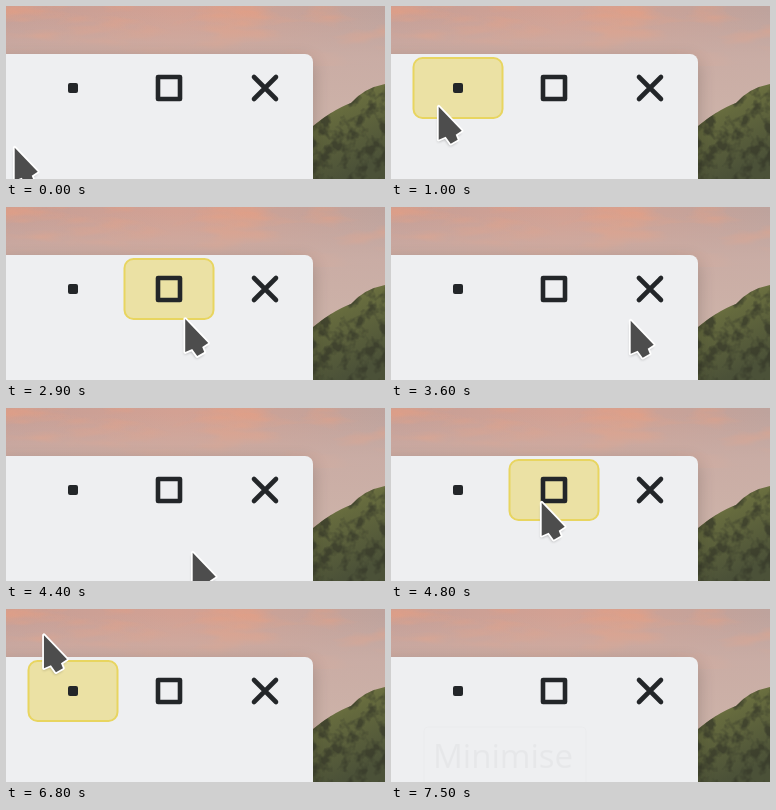
Animation of 379 by 173 pixels, one loop 7600 ms. Source, as an HTML page:

```html
<!DOCTYPE html>
<html lang="en">
<head>
<meta charset="utf-8">
<title>Window buttons</title>
<style>
  html, body { margin: 0; width: 100%; height: 100%; overflow: hidden; }
  svg { display: block; width: 379px; height: 173px; }
  .button { rx: 9px; fill: #e8d560; stroke: #e8d560; stroke-width: 2; fill-opacity: .53; }
  #close { fill: #e0525f; stroke: #e0525f; }
  .icon { fill: none; stroke: #232629; stroke-width: 4.6; stroke-linecap: round; stroke-linejoin: round; }
  #tip text { font: 33px "Open Sans", "Noto Sans", sans-serif; fill: #232629; }
</style>
</head>
<body>
<svg viewBox="0 0 379 173">
  <defs>
    <linearGradient id="sky">
      <stop offset="0" stop-color="#c59f97"/>
      <stop offset=".45" stop-color="#d3a193"/>
      <stop offset="1" stop-color="#bea39d"/>
    </linearGradient>
    <linearGradient id="haze" x2="0" y2="1">
      <stop offset=".03" stop-color="#cbaea6" stop-opacity="0"/>
      <stop offset=".3" stop-color="#cbaea6" stop-opacity=".85"/>
      <stop offset=".7" stop-color="#cdb3a9"/>
    </linearGradient>
    <linearGradient id="grass" x2=".4" y2="1">
      <stop offset="0" stop-color="#86874a"/>
      <stop offset=".4" stop-color="#666b3e"/>
      <stop offset="1" stop-color="#4b5138"/>
    </linearGradient>
    <filter id="clouds" x="0" y="0" width="1" height="1" color-interpolation-filters="sRGB">
      <feTurbulence type="fractalNoise" baseFrequency=".015 .06" numOctaves="3" seed="4"/>
      <feColorMatrix values="0 0 0 0 .92  0 0 0 0 .62  0 0 0 0 .5  3 0 0 0 -1.3"/>
    </filter>
    <filter id="rocks" x="0" y="0" width="1" height="1" color-interpolation-filters="sRGB">
      <feTurbulence type="fractalNoise" baseFrequency=".08" numOctaves="3" seed="9"/>
      <feColorMatrix values="0 0 0 0 .21  0 0 0 0 .22  0 0 0 0 .16  4 0 0 0 -1.75"/>
      <feComposite in2="SourceGraphic" operator="in"/>
    </filter>
    <filter id="blur" x="-20%" y="-20%" width="140%" height="140%"><feGaussianBlur stdDeviation="9"/></filter>
    <filter id="soft" x="-40%" y="-40%" width="180%" height="180%"><feGaussianBlur stdDeviation="1.5"/></filter>
    <path id="hill" d="M300 126Q325 104 345 97 358 82 379 78V173H300Z"/>
    <path id="arrow" d="M0 0V33L7 30 12 37 19 33 17 28 23 24Z"/>
  </defs>

  <rect width="379" height="173" fill="url(#sky)"/>
  <rect width="379" height="60" filter="url(#clouds)" opacity=".6"/>
  <rect width="379" height="173" fill="url(#haze)"/>
  <use href="#hill" fill="url(#grass)"/>
  <use href="#hill" filter="url(#rocks)" opacity=".7"/>

  <rect x="-30" y="54" width="337" height="160" rx="9" fill="#000" opacity=".2" filter="url(#blur)"/>
  <rect x="-30" y="48" width="337" height="160" rx="8" fill="#eeeff1"/>

  <rect class="button" id="min" x="22.5" y="52" width="89" height="60"/>
  <rect class="button" id="max" x="118.5" y="52" width="89" height="60"/>
  <rect class="button" id="close" x="214.5" y="52" width="89" height="60"/>
  <rect x="62" y="77" width="10" height="10" rx="2" fill="#232629"/>
  <path class="icon" d="M152 71h22v22h-22zM248 71l22 22M270 71l-22 22"/>

  <g id="tip">
    <rect x="33" y="118" width="162" height="70" rx="4" fill="#eeeff1" stroke="#999"/>
    <text x="42" y="159">Minimise</text>
  </g>

  <g id="cursor">
    <use href="#arrow" y="2" opacity=".3" filter="url(#soft)"/>
    <use href="#arrow" x=".7" y="-.3" fill="#4d4d4d" stroke="#fff" stroke-width="3.6" stroke-linejoin="round" style="paint-order:stroke"/>
  </g>
</svg>
<script>
  const LOOP = 7600, STEP = 100, FADE_STEPS = 2;
  const $ = id => document.getElementById(id);
  const buttons = { min: 22, max: 118, close: 214 };

  // Pointer moves: start, duration, goal x, goal y, downward bow.
  const moves = [
    [400, 600, 47, 101, 0],
    [1100, 800, 166, 121, 25],
    [1900, 500, 160, 90, 0],
    [2800, 800, 239, 114, 25],
    [3600, 300, 260, 88, 0],
    [3900, 500, 186, 145, 0],
    [4400, 400, 150, 95, 0],
    [6100, 100, 147, 115, 0],
    [6200, 400, 60, 86, 0],
    [6600, 800, 8, -50, 0]
  ];

  const progress = (t, start, span) => Math.min(1, Math.max(0, (t - start) / span));
  const easeOut = p => p * (2 - p);

  function pointer(t) {
    let x = 8, y = 142;
    for (const [start, span, goalX, goalY, bow] of moves) {
      const p = easeOut(progress(t, start, span));
      x += (goalX - x) * p;
      y += (goalY - y) * p + bow * Math.sin(Math.PI * p);
    }
    return [x, y];
  }

  function isOver(left, t) {
    const [x, y] = pointer(t);
    return x > left && x < left + 90 && y > 51 && y < 113;
  }

  // A highlight fades as the average of the preceding steps.
  function highlight(left, t) {
    let sum = 0;
    for (let k = 1; k <= FADE_STEPS; k++) sum += isOver(left, t - k * STEP);
    return sum / FADE_STEPS;
  }

  function draw() {
    const t = Math.floor(performance.now() % LOOP / STEP) * STEP;
    $("cursor").setAttribute("transform", `translate(${pointer(t)})`);
    for (const id in buttons) $(id).style.opacity = highlight(buttons[id], t);
    $("max").style.fillOpacity = .53 + .29 * (progress(t, 5300, 400) - progress(t, 6200, 400));
    $("tip").style.opacity = progress(t, 7400, 3300);
    requestAnimationFrame(draw);
  }
  draw();
</script>
</body>
</html>
```
